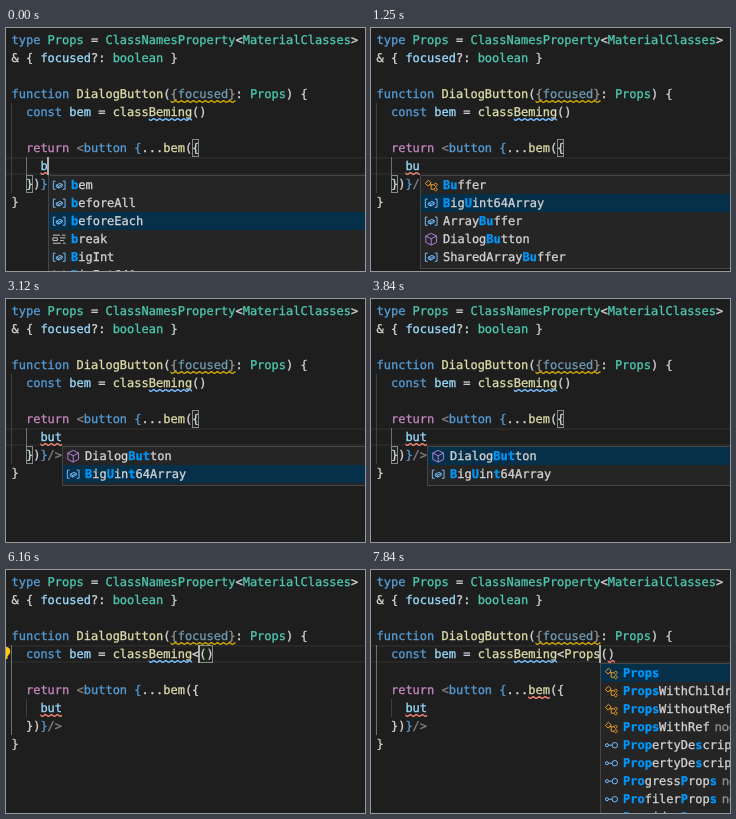
Animation of 359x243 px, one loop 8000 ms. Source, as an HTML page with a canvas:

```html
<!DOCTYPE html>
<html lang="en">
<head>
<meta charset="utf-8">
<title>Code editor with completion</title>
<style>
html, body { margin: 0; width: 100%; height: 100%; overflow: hidden; background: #1e1e1e; }
canvas { display: block; }
</style>
</head>
<body>
<canvas id="stage" width="359" height="243"></canvas>
<script>
const ctx = document.getElementById('stage').getContext('2d');
const LOOP = 8000, LEFT = 5.5, TOP = 3, CHAR = 7.224, LINE = 18;
const MONO = '12px "DejaVu Sans Mono", monospace';
const SANS = '12px Inter, sans-serif';
const C = {
  w: '#d4d4d4', b: '#569cd6', t: '#4ec9b0', v: '#9cdcfe', f: '#dcdcaa',
  r: '#c586c0', g: '#808080', d: '#969696', u: '#719bb2',
  error: '#f48771', warn: '#cca700', info: '#75beff', match: '#0097fb'
};
const ICONS = {
  variable: ['#75beff', 'M4 3.5H1.5v9H4M12 3.5h2.5v9H12M4.8 8l4-2 2.6 1.2v2l-4 2-2.6-1.2zM4.8 8l2.6 1.2 4-2M7.4 9.2v2'],
  class: ['#ee9d28', 'M1.5 6l3.5-3.5 3 3L4.5 9zM6 7.5h5M8 7.5v5h3M11 7.5l2-2 2 2-2 2zM11 12.5l2-2 2 2-2 2z'],
  method: ['#b180d7', 'M8 1.5l6 3v7l-6 3-6-3v-7zM2 4.5l6 3 6-3M8 7.5v7'],
  keyword: ['#c5c5c5', 'M1 3.5h8M11 3.5h4M1 6.5h5v3H1zM9 6.5h6M9 9.5h4M1 12.5h9M12 12.5h3'],
  interface: ['#75beff', 'M5 8a1.7 1.7 0 1 1-3.4 0a1.7 1.7 0 1 1 3.4 0M5 8h4M15 8a3 3 0 1 1-6 0a3 3 0 1 1 6 0']
};
const items = (icon, names, detail = '') => names.split(' ').map(name => ({ icon, name, detail }));
const LISTS = {
  b: [...items('variable', 'bem beforeAll beforeEach'), ...items('keyword', 'break'),
    ...items('variable', 'BigInt BigInt64Array')],
  bu: [...items('class', 'Buffer'), ...items('variable', 'BigUint64Array ArrayBuffer'),
    ...items('method', 'DialogButton'), ...items('variable', 'SharedArrayBuffer')],
  but: [...items('method', 'DialogButton'), ...items('variable', 'BigUint64Array')],
  props: [...items('class', 'Props'),
    ...items('class', 'PropsWithChildren PropsWithoutRef PropsWithRef', 'node_modules'),
    ...items('interface', 'PropertyDescriptor PropertyDescriptorMap'),
    ...items('interface', 'ProgressProps ProfilerProps ProviderProps', 'node_modules')]
};
const MOVES = [[-370, 7, 5], [530, 7, 6], [2400, 7, 7], [4380, 6, 7], [4560, 5, 0], [4740, 4, 7],
  [5180, 4, 27], [5360, 4, 26], [5540, 4, 25], [6160, 4, 26]];

const colX = col => LEFT + col * CHAR;
const lineY = line => TOP + line * LINE;

function rect(color, x, y, w, h) {
  ctx.fillStyle = color;
  ctx.fillRect(x, y, w, h);
}

// A hairline outline gives the slightly heavier editor text.
function text(str, color, x, y, font = MONO) {
  ctx.font = font;
  ctx.fillStyle = ctx.strokeStyle = color;
  ctx.lineWidth = 0.3;
  ctx.fillText(str, x, y);
  ctx.strokeText(str, x, y);
}

// Tokens alternate between a colour key and a string.
function tokens(x, y, ...parts) {
  for (let i = 0; i < parts.length; i += 2) {
    text(parts[i + 1], C[parts[i]], x, y);
    x += parts[i + 1].length * CHAR;
  }
}

const code = (line, ...parts) => tokens(LEFT, lineY(line) + 13, ...parts);

function squiggle(color, line, from, to) {
  const x0 = colX(from), x1 = colX(to), y = lineY(line) + LINE;
  ctx.save();
  ctx.beginPath();
  ctx.rect(x0, y - 3, x1 - x0, 3);
  ctx.clip();
  ctx.beginPath();
  for (let x = x0 - 1, up = 0; x < x1 + 3; x += 3, up ^= 1) ctx.lineTo(x, y - (up ? 0.4 : 2.6));
  ctx.strokeStyle = color;
  ctx.lineWidth = 1.3;
  ctx.stroke();
  ctx.restore();
}

function bracket(line, col, chars = 1) {
  const x = Math.round(colX(col)), y = lineY(line), w = Math.round(chars * CHAR);
  rect('rgba(0,100,0,.1)', x, y, w, LINE);
  ctx.strokeStyle = '#888';
  ctx.lineWidth = 1;
  ctx.strokeRect(x + 0.5, y + 0.5, w - 1, LINE - 1);
}

function panel(x, y, h) {
  rect('#454545', x, y, 400, h);
  rect('#252526', x + 1, y + 1, 400, h - 2);
}

function icon(name, x, y) {
  const [color, path] = ICONS[name];
  ctx.save();
  ctx.translate(x, y);
  ctx.scale(0.9, 0.9);
  ctx.strokeStyle = color;
  ctx.lineWidth = 1.1;
  ctx.stroke(new Path2D(path));
  ctx.restore();
}

function suggestions(line, col, list, word, selected) {
  const x = Math.floor(colX(col) + 0.5), y = lineY(line + 1);
  panel(x, y, list.length * LINE + 4);
  list.forEach(({ icon: kind, name, detail }, i) => {
    const top = y + 1 + i * LINE;
    if (i === selected) rect('#062f4a', x + 1, top, 400, LINE);
    icon(kind, x + 4, top + 2);
    let hit = 0;
    [...name].forEach((ch, k) => {
      const found = hit < word.length && ch.toLowerCase() === word[hit].toLowerCase();
      if (found) hit++;
      text(ch, found ? C.match : C.w, x + 23 + k * CHAR, top + 13, (found ? 'bold ' : '') + MONO);
    });
    text(detail, '#909090', x + 28 + name.length * CHAR, top + 13, SANS);
  });
}

function hint(line, col) {
  const left = Math.floor(colX(col) + 0.5), x = left + 6, y = lineY(line + 1);
  const bold = (str, bx, by) => {
    text(str, C.w, bx, by, 'bold ' + MONO);
    rect(C.w, bx, by + 2, str.length * CHAR, 1);
  };
  panel(left, y, 200);
  text('classBeming<', C.w, x, y + 18);
  bold('Ctx extends {', x + 12 * CHAR, y + 18);
  bold('string | undefined; }', x, y + 36);
  text('Ctx["classnames"]>(context', C.w, x, y + 54);
  text('ClassNamed', C.w, x, y + 72);
  rect('#454545', left, y + 81, 400, 1);
  text('Set context', C.w, x, y + 103, SANS);
  text('@example', C.w, x, y + 129, 'italic ' + SANS);
  tokens(x + 2 * CHAR, y + 154, 'b', 'const ', 'v', 'bem', 'w', ' = ', 'f', 'classBeming');
}

function bulb() {
  ctx.fillStyle = '#ffcc00';
  ctx.fill(new Path2D('M-2 77C3 76 5 80 4 83L1.500 86.500V89H-2z'));
}

function draw(t) {
  const word = 'but'.slice(0, t < 530 ? 1 : t < 2400 ? 2 : 3);
  const count = t < 7490 ? 0 : Math.min(5, 1 + Math.floor((t - 7490) / 87.5));
  const generic = 'Props'.slice(0, count);
  const open = t >= 6160;
  const paren = 25 + (open ? 1 + count : 0);
  let [since, line, col] = MOVES.filter(m => m[0] <= t).pop();
  if (count) {
    since = 7490 + 87.5 * (count - 1);
    col = 26 + count;
  }

  rect('#1e1e1e', 0, 0, 359, 243);
  rect('#282828', 0, lineY(line), 359, 2);
  rect('#282828', 0, lineY(line) + LINE - 2, 359, 2);
  const inner = line === 7;
  rect(inner ? '#404040' : '#707070', Math.floor(LEFT), lineY(4), 1, 5 * LINE);
  rect(inner ? '#707070' : '#404040', Math.round(colX(2)), lineY(7), 1, LINE);
  if (t >= 5810 && !open) rect('rgba(87,87,87,.72)', colX(14), lineY(4), 11 * CHAR, LINE);

  const boxes = t < 4470 ? [[6, 25], [8, 2]] : t < 5180 ? [[3, 40], [9, 0]] : t < 6690 ? [[4, paren, 2]] : [];
  boxes.forEach(box => bracket(...box));

  code(0, 'b', 'type ', 't', 'Props', 'w', ' = ', 't', 'ClassNamesProperty', 'w', '<',
    't', 'MaterialClasses', 'w', '>');
  code(1, 'w', '& { ', 'v', 'focused', 'w', '?: ', 't', 'boolean', 'w', ' }');
  code(3, 'b', 'function ', 'f', 'DialogButton', 'w', '(', 'd', '{', 'u', 'focused', 'd', '}',
    'w', ': ', 't', 'Props', 'w', ') {');
  code(4, 'b', '  const ', 'v', 'bem', 'w', ' = ', 'f', 'classBeming',
    'w', open ? '<' : '', 'f', generic, 'w', '()');
  code(6, 'r', '  return ', 'g', '<', 'b', 'button {', 'w', '...', 'f', 'bem', 'w', '({');
  code(7, 'v', '    ' + word);
  code(8, 'w', '  })', 'b', '}', 'g', '/>');
  code(9, 'w', '}');

  squiggle(C.warn, 3, 22, 31);
  squiggle(C.info, 4, 19, 25);
  squiggle(C.error, 7, 4, t < 1250 ? 5 : t < 3120 ? 6 : 7);
  if (t >= 6690) squiggle(C.error, 4, paren + 1, paren + 2);
  if (t >= 7230) squiggle(C.error, 6, 21, 24);
  if (t >= 5810 && t < 6600) bulb();

  const age = t - since;
  if (age < 450 || (age >= 980 && age < 1430)) {
    rect('#aeafad', Math.floor(colX(col) - 0.5), lineY(line), 2, LINE);
  }

  if (t < 4200) {
    const selected = t < 530 ? 2 : t < 2400 ? +(t >= 1250) : +(t >= 2940 && t < 3210);
    suggestions(7, col, LISTS[word], word, selected);
  } else if (count >= 4) {
    suggestions(4, col, LISTS.props, generic, 0);
  } else if (t >= 6340) {
    hint(4, col);
  }
}

ctx.textRendering = 'geometricPrecision';
const start = performance.now();
function tick() {
  draw((performance.now() - start) % LOOP);
  requestAnimationFrame(tick);
}
tick();
</script>
</body>
</html>
```
